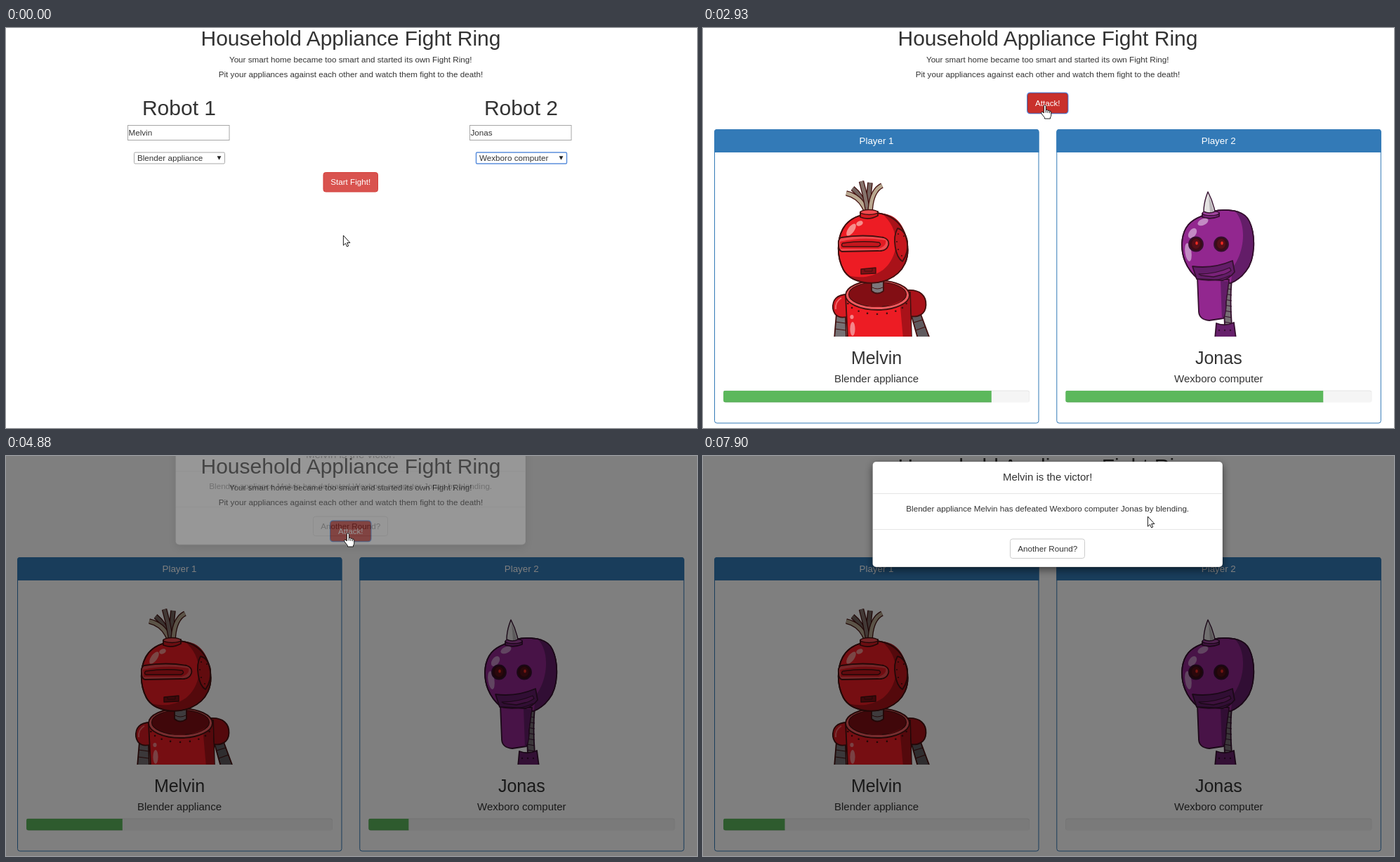
Animation of 984x569 px, one loop 7.99 s. Source, as an HTML page:

```html
<!DOCTYPE html>
<html lang="en">
<head>
<meta charset="utf-8">
<title>Household Appliance Fight Ring</title>
<style>
  html, body { margin: 0; width: 100%; height: 100%; overflow: hidden; background: #fff; }
  svg { display: block; width: 984px; height: 569px; font-family: "Liberation Sans", Arial, sans-serif; }
</style>
</head>
<body>
<svg id="stage" viewBox="0 0 984 569" xmlns="http://www.w3.org/2000/svg"></svg>
<script>
const LOOP = 7990;
const BODY = 11.67;
const names = ['Melvin', 'Jonas'];
const kinds = ['Blender appliance', 'Wexboro computer'];

// ---------- markup helpers ----------
const text = (x, y, size, str, fill = '#333', anchor = 'middle') =>
  `<text x="${x}" y="${y}" font-size="${size}" fill="${fill}" text-anchor="${anchor}">${str}</text>`;
const box = (x, y, w, h, fill, stroke, extra = '') =>
  `<rect x="${x}" y="${y}" width="${w}" height="${h}" fill="${fill}" stroke="${stroke}" ${extra}/>`;
const path = (d, fill, extra = '') => `<path d="${d}" fill="${fill}" ${extra}/>`;
const oval = (x, y, rx, ry, fill, extra = '') =>
  `<ellipse cx="${x}" cy="${y}" rx="${rx}" ry="${ry}" fill="${fill}" ${extra}/>`;
const bare = 'stroke="none"';
const tilt = (a, x, y) => `stroke="none" transform="rotate(${a} ${x} ${y})"`;

function formSide(i) {
  const dx = i * 487;
  return `<g transform="translate(${dx} 0)">
    ${text(246.5, 124, 30, 'Robot ' + (i + 1))}
    ${box(173.5, 138.5, 144.5, 21, '#fff', '#a6a6a6')}
    ${text(174.5, 153.3, BODY, names[i], '#333', 'start')}
    ${box(182.5, 177, 129, 16, '#fff', i ? '#5b8fdc' : '#a9a9a9', `rx="1.5" stroke-width="${i ? 1.5 : 1}"`)}
    ${text(187, 189.2, BODY, kinds[i], '#333', 'start')}
    ${path('M300.6 182.2h5.8l-2.9 5.6Z', '#222')}
  </g>`;
}

function panel(i) {
  return `<g transform="translate(${i * 487.3} 0)">
    ${box(16.5, 144.5, 461.5, 417.5, '#fff', '#337ab7', 'rx="3.3"')}
    ${path('M16 177V148q0-4 4-4H474.500q4 0 4 4V177Z', '#337ab7')}
    ${text(247, 165, 13.33, 'Player ' + (i + 1), '#fff')}
    ${text(247, 478, 25, names[i])}
    ${text(247, 504, 15, kinds[i])}
    <g clip-path="url(#track)">
      ${box(29, 516, 436, 16.5, '#f5f5f5', 'none')}
      ${box(28.5, 515.5, 437, 18, 'none', '#e6e6e6', 'rx="3.5" stroke-width="2"')}
      <g id="bar${i}">${box(-436, 516, 436, 16.5, '#5cb85c', 'none')}
      ${box(-436, 531.6, 436, 1, '#4e9c4e', 'none')}</g>
    </g>
  </g>`;
}

function redRobot() {
  const ink = '#43100f';
  const wires = [
    ['M234 263Q227 239 213 228', '#75645f'], ['M237 263Q235 240 238 220', '#75645f'],
    ['M233 263Q226 240 204 235', '#b8a78f'], ['M235 263Q232 240 225.500 218', '#85736c'],
    ['M238 263Q239 232 255 224', '#b8a78f']
  ].map(([d, c]) => `<path d="${d}" fill="none" stroke-width="7.6"/><path d="${d}" fill="none" stroke="${c}" stroke-width="5"/>`).join('');
  let rivets = '';
  for (let k = 0; k < 9; k++) {
    const a = Math.PI * (0.08 + k * 0.105);
    rivets += oval(248 + 43 * Math.cos(a), 387 + 20 * Math.sin(a), 1.3, 1.3, ink, bare);
  }
  const head = 'M226 266C250 258 279 266 289 297C297 327 286 348 263 358C241 367 211 363 200 344C190 325 191 301 199 286C205 275 215 269 226 266Z';
  return `<g stroke="${ink}" stroke-width="1.8" stroke-linejoin="round" clip-path="url(#art)">
    ${path('M190 406L187 442H204L203 410Z', '#767174')}
    ${path('M189 418l14 2M188 428l15 2', 'none', 'stroke-width="1.2"')}
    ${path('M297 410L306 442H323L310 407Z', '#5f5a5e')}
    ${path('M300 419l13-4M303 430l14-5', 'none', 'stroke-width="1.2"')}
    ${path('M206 379C190 379 184 387 185 399C187 411 197 414 207 410Z', '#d81b22')}
    ${path('M189 400Q188 389 197 384', 'none', 'stroke="#f2686a" stroke-width="2"')}
    ${path('M292 373C309 372 318 381 317.500 394C317 407 307 412 295 410Z', '#a91219')}
    ${path('M203 379L206 442H297L295 376Z', '#ed1c24')}
    ${path('M281 397L285 442H297L294 382Z', '#a91219', bare)}
    ${oval(248.500, 380, 45.500, 21, '#f15b5f')}
    ${oval(248.500, 379, 41, 17.500, '#820e14', 'stroke-width="1.2"')}
    ${path('M214 387Q248 407 285 386Q279 393 263 395.500Q231 398 214 387', '#a91219', bare)}
    ${rivets}
    ${oval(213, 428, 3.6, 10, '#f4868a', bare)}${oval(212, 411, 2.6, 3, '#f4868a', bare)}
    ${path('M240 360V374Q248 381 257 374V360Z', '#7c777b')}
    ${path('M241 369Q248 373 256 369', 'none', 'stroke-width="1"')}
    ${wires}
    ${path(head, '#ed1c24')}
    ${path('M254 263.500C282 266 290 290 291 312C292 338 278 352 259 358.500C241 365 217 362 207 352C229 358 253 352 265 335C281 313 277 282 254 263.500Z', '#a91219', bare)}
    ${path('M277 285C269 299 274 326 284 332Q293 320 291 303Q287 287 277 285Z', '#c4161d')}
    ${[[278, 293], [276, 304], [278, 315], [283, 324], [286, 296]].map(p => oval(...p, 1.1, 1.1, ink, bare)).join('')}
    ${path(head, 'none')}
    ${path('M224 262V269Q236 274 249 267V261Z', '#d81b22')}
    ${oval(236.500, 262, 12.500, 3.5, '#f04a4e', 'stroke-width="1.3"')}
    ${oval(211, 287, 4.5, 10, '#f68f8c', tilt(35, 211, 287))}
    ${oval(223, 278, 5, 3.4, '#f68f8c', tilt(-25, 223, 278))}
    ${path('M197 298Q228 293 257 298Q266 301 264 309Q261 318 249 317L198 318Q193 317 193 308Q192 300 197 298Z', '#f0494e')}
    ${path('M195 304Q228 296 260 302Q262 310 250 314L196 314Z', '#e21b23', bare)}
    ${path('M199 306Q226 302 251 305Q255 309 249 311L199 311Q196 309 199 306Z', '#c4161d', 'stroke-width="1.4"')}
    ${path('M225 343L246 341V349L225 350Z', '#7d1116', 'stroke-width="1.4"')}
    ${path('M230 343V346H241V342', 'none', 'stroke-width="1"')}
  </g>`;
}

function purpleRobot() {
  const ink = '#35102f';
  const head = 'M709 268C731 255 769 255 778 275C787 294 787 329 773 346Q764 358 751 363L705 357C688 343 680 323 682.500 301C685 283 694 274 709 268Z';
  const eye = x => oval(x, 307.500, 10, 10.200, '#3b0c17') + oval(x, 307, 6, 7, '#561019', bare) +
    oval(x + 1, 306, 1.8, 2.5, '#f02a22', bare);
  let rings = '';
  for (let y = 370; y < 420; y += 8) rings += `M742 ${y}l11 2`;
  return `<g stroke="${ink}" stroke-width="1.8" stroke-linejoin="round" clip-path="url(#art)">
    ${path('M740 358L743 424H753Q750 385 753 358Z', '#776f75')}
    ${path(rings, 'none', 'stroke-width="1.2"')}
    ${path('M731 420Q744 425 756 419L759 442H729Z', '#66206b')}
    ${[735, 743, 751].map(x => oval(x, 430, 1.2, 1.2, ink, bare)).join('')}
    ${path(head, '#92278f')}
    ${path('M758 261C781 267 784 285 784 307C782 337 773 351 752 362L754 341C770 321 776 282 758 261Z', '#631d68', bare)}
    ${path(head, 'none')}
    ${path('M711 264V269Q723 273 735 268V263Z', '#7a227a')}
    ${oval(723, 263.500, 12, 3.2, '#a145a0', 'stroke-width="1.3"')}
    ${path('M719 233Q713 248 713 261Q721 265 729 261Q726 246 719 233Z', '#e4e2e2', 'stroke-width="1.4"')}
    ${path('M720 238Q725 250 727 261L722 262Z', '#b9b5b8', bare)}
    ${oval(691, 319, 4.5, 13, '#c38bc4', tilt(-8, 691, 319))}
    ${oval(697, 292, 5, 8, '#c38bc4', tilt(35, 697, 292))}
    ${oval(712, 276, 8, 4.500, '#c38bc4', tilt(-25, 712, 276))}
    ${eye(702)}${eye(738)}
    ${path('M704 355L706 404Q707 415 721 416L741 413Q745 406 745 388L749 358Z', '#92278f')}
    ${path('M737 360L739 414Q745 409 744 390L748 360Z', '#631d68', bare)}
    ${path('M697 339Q726 343 754 331L757 347Q749 357 740 359L703 357Z', '#631d68')}
    ${path('M706 350Q730 350 750 341L752 345Q745 350 739 351L727 354L709 352Z', '#7a227a', 'stroke-width="1.3"')}
    ${path('M703 357Q727 363 751 352', 'none', 'stroke-width="1.2"')}
  </g>`;
}

const $ = id => document.getElementById(id);
const button = (id, x, y, w, h, label, base) =>
  `<rect id="${id}Ring" x="${x - .7}" y="${y - .7}" width="${w + 1.4}" height="${h + 1.4}" rx="3.6" fill="none" stroke="#4d86e8" stroke-width="1.5"/>
   ${box(x, y, w, h, '#d9534f', '#d43f3a', `id="${id}" rx="3.3"`)}${text(x + w / 2, base, BODY, label, '#fff')}`;

$('stage').innerHTML = `
  <defs>
    <clipPath id="track"><rect x="29" y="515.5" width="436" height="17" rx="3.3"/></clipPath>
    <clipPath id="art"><rect x="150" y="200" width="700" height="239"/></clipPath>
    <filter id="shade" x="-10%" y="-20%" width="120%" height="150%">
      <feDropShadow dx="0" dy="4" stdDeviation="6" flood-color="#000" flood-opacity=".5"/>
    </filter>
  </defs>
  <rect width="984" height="569" fill="#fff"/>
  ${text(491, 25, 30, 'Household Appliance Fight Ring')}
  ${text(490.700, 49.200, BODY, 'Your smart home became too smart and started its own Fight Ring!')}
  ${text(491, 70, BODY, 'Pit your appliances against each other and watch them fight to the death!')}
  <g id="form">${formSide(0)}${formSide(1)}${button('start', 452, 205.5, 77.500, 27.500, 'Start Fight!', 223.200)}</g>
  <g id="fight">${button('attack', 462.500, 93, 56.500, 27.800, 'Attack!', 111)}
    ${panel(0)}${panel(1)}${redRobot()}${purpleRobot()}</g>
  <rect id="backdrop" width="984" height="569" fill="#000"/>
  <g id="modal">
    <rect x="241.5" y="8" width="498.5" height="150" rx="5" fill="#fff" stroke="#000" stroke-opacity=".2" filter="url(#shade)"/>
    ${text(490.700, 35, 15, names[0] + ' is the victor!')}
    ${path('M242 53.5H740M242 104.5H740', 'none', 'stroke="#e5e5e5"')}
    ${text(490.700, 79.200, BODY, `${kinds[0]} ${names[0]} has defeated ${kinds[1]} ${names[1]} by blending.`)}
    ${box(437.500, 118, 106, 27.500, '#fff', '#ccc', 'rx="3.3"')}
    ${text(490.700, 136, BODY, 'Another Round?')}
  </g>
  <g stroke="#111" stroke-width=".95" fill="#fff" stroke-linejoin="round">
    <path id="arrow" d="M.4 0V14.200L3.500 11.300L5.600 16L7.700 15L5.700 10.500H9.900Z"/>
    <path id="hand" d="M-1.600 11V1.300a1.450 1.450 0 0 1 2.900 0V6.500q2.300-.6 2.700.8q2.200-.6 2.600.9q2.200-.2 2.200 1.600v4.200q0 1.800-1.200 3v2H-.5v-1.500L-4.800 12q-1.200-2.400.4-2.800q1.400-.1 2.800 1.800ZM1.300 6.500v4M4 7.300v3.500M6.600 8.200v3"/>
  </g>`;

// ---------- timing ----------
// The screen refreshes in bursts: [start, end, intervals].
const bursts = [
  [380, 1080, 9], [1540, 1910, 5], [1910, 2320, 5], [2700, 3390, 9], [3760, 4320, 7],
  [4640, 4880, 3], [4880, 5250, 5], [5960, 6730, 10], [6810, 7520, 9], [7840, 7900, 1]
];
function snap(t) {
  const b = bursts.find(([a, z]) => t >= a && t < z);
  if (!b) return t;
  const step = (b[1] - b[0]) / b[2];
  return b[0] + Math.floor((t - b[0]) / step + 1e-6) * step + 1e-6;
}

const clamp = v => Math.max(0, Math.min(1, v));
function bezier(x1, y1, x2, y2) {
  const at = (a, b, u) => 3 * a * u * (1 - u) ** 2 + 3 * b * u * u * (1 - u) + u ** 3;
  return x => {
    let lo = 0, hi = 1;
    for (let i = 0; i < 24; i++) {
      const mid = (lo + hi) / 2;
      if (at(x1, x2, mid) < x) lo = mid; else hi = mid;
    }
    return at(y1, y2, lo);
  };
}
const ease = bezier(.25, .1, .25, 1);
const easeOut = bezier(0, 0, .58, 1);

const SWITCH = 1000, BACKDROP = 4702, MODAL = 4852, RELEASE = 4940;
const hits = [2760, 3705, 4690];
const ends = [[465, 352, 225, 116.5], [465, 321, 155.700, 28]];
const presses = [[860, 1000], [2700, 2770], [3610, 3755], [4640, 4700]];

// Pointer path: time, x, y.
const track = [
  [310, 480, 295], [500, 483, 262], [700, 487, 215], [1540, 487, 215], [1700, 497, 185],
  [1910, 503, 145], [2150, 489, 113], [2320, 487, 110], [5180, 487, 110], [5250, 486, 109],
  [5950, 486, 109], [5960, 482, 106], [6200, 452, 90], [6420, 431, 79], [6730, 478, 73],
  [7150, 556, 74], [7440, 633, 81], [7520, 634, 82], [7839, 634, 82], [7840, 633, 84], [7900, 633, 86]
];
function pointer(t) {
  const i = track.findIndex(k => k[0] > t);
  if (i === 0) return track[0].slice(1);
  if (i < 0) return track[track.length - 1].slice(1);
  const [a, b] = [track[i - 1], track[i]];
  const p = (t - a[0]) / (b[0] - a[0]);
  return [a[1] + (b[1] - a[1]) * p, a[2] + (b[2] - a[2]) * p];
}

function paintButton(id, over, down, focus) {
  const [fill, edge] = down ? ['#ac2925', '#761c19'] : over ? ['#c9302c', '#ac2925'] : ['#d9534f', '#d43f3a'];
  $(id).setAttribute('fill', fill);
  $(id).setAttribute('stroke', edge);
  $(id + 'Ring').style.display = focus ? '' : 'none';
}
const show = (id, on) => { $(id).style.display = on ? '' : 'none'; };

function draw(time) {
  const t = snap(time);
  const [x, y] = pointer(t);
  const inForm = t < SWITCH;
  show('form', inForm);
  show('fight', !inForm);

  const overStart = inForm && y < 233;
  const overAttack = !inForm && y < 121 && t < RELEASE;
  const down = presses.some(([a, b]) => t >= a && t < b);
  paintButton('start', overStart, down, t >= 860);
  paintButton('attack', overAttack, down, t >= 2700);

  ends.forEach((stops, i) => {
    const edge = hits.reduce((v, h, k) =>
      v + (stops[k + 1] - stops[k]) * ease(clamp((t - h) / 600)), stops[0]);
    $('bar' + i).setAttribute('transform', `translate(${edge} 0)`);
  });

  $('backdrop').setAttribute('opacity', .5 * clamp((t - BACKDROP) / 150));
  show('modal', t > MODAL);
  $('modal').setAttribute('opacity', clamp((t - MODAL) / 150));
  $('modal').setAttribute('transform', `translate(0 ${-37.5 * (1 - easeOut(clamp((t - MODAL) / 300)))})`);

  const hand = overStart || overAttack;
  show('hand', hand);
  show('arrow', !hand);
  $(hand ? 'hand' : 'arrow').setAttribute('transform', `translate(${x} ${y})`);
}

const t0 = performance.now();
function tick() {
  draw((performance.now() - t0) % LOOP);
  requestAnimationFrame(tick);
}
tick();
</script>
</body>
</html>
```
